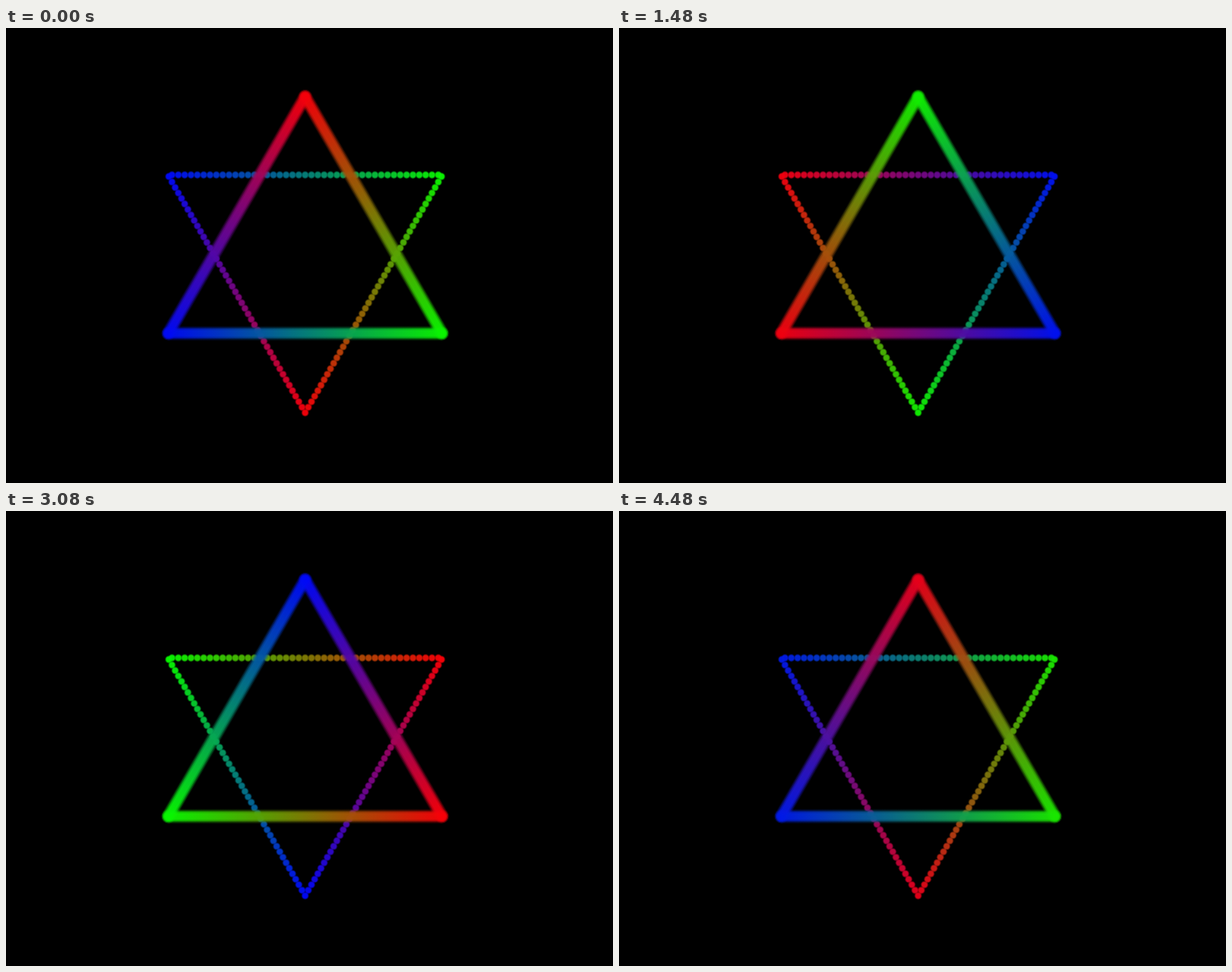
An HTML page with a canvas for the animation above (4520 ms loop, 768x576 px).

```html
<!DOCTYPE html>
<html lang="en">
<head>
<meta charset="utf-8">
<title>Colour-cycling star</title>
<style>
html, body { margin: 0; width: 100%; height: 100%; overflow: hidden; background: #000; }
canvas { display: block; }
</style>
</head>
<body>
<canvas id="stage" width="768" height="576"></canvas>
<script>
const ctx = document.getElementById('stage').getContext('2d');
const LOOP = 4520, STEP = 40, FADE = 1530, DELAY = 185, DOTS = 43;
const PRIMARIES = [[255, 0, 0], [0, 255, 0], [0, 0, 255]];

// Corners in the order top/bottom, right, left, so both triangles share colours.
const solid = [[378.5, 87], [551.5, 386.5], [205.5, 386.5]];
const dotted = [[378.5, 487], [551, 188], [206, 188]];

// Soft profiles, from the outer rim to the core: [size, opacity].
const lineLayers = [[18, .14], [15.5, .32], [13, .42], [11, .55], [8, .8]];
const dotLayers = [[4.9, .28], [4.2, .5], [3.4, .9]];

const mix = (a, b, k) => a.map((v, i) => v + (b[i] - v) * k);
const css = (c, alpha) => `rgba(${c.map(Math.round).join()},${alpha})`;
const smooth = u => u * u * (3 - 2 * u);

function cornerColours(time) {
  const phase = (time - DELAY) / FADE + 3;
  const n = Math.floor(phase);
  const eased = smooth(phase - n);
  return [0, 1, 2].map(i =>
    mix(PRIMARIES[(n + i) % 3], PRIMARIES[(n + i + 1) % 3], eased));
}

function dot([x, y], colour) {
  for (const [r, alpha] of dotLayers) {
    ctx.fillStyle = css(colour, alpha);
    ctx.beginPath();
    ctx.arc(x, y, r, 0, 7);
    ctx.fill();
  }
}

function drawDotted(colours) {
  for (let i = 0; i < 3; i++) {
    const j = (i + 1) % 3;
    const level = i === 1; // the level side sits half a step along
    for (let d = 0; d < DOTS; d++) {
      const k = (d + (level ? .5 : 0)) / DOTS;
      const [x, y] = mix(dotted[i], dotted[j], k);
      dot([x, level ? 186 : y], mix(colours[i], colours[j], k));
    }
  }
  dot(dotted[1], colours[1]);
}

function drawSolid(colours) {
  ctx.lineCap = 'round';
  for (const [width, alpha] of lineLayers) {
    ctx.lineWidth = width;
    for (let i = 0; i < 3; i++) {
      const j = (i + 1) % 3;
      const gradient = ctx.createLinearGradient(...solid[i], ...solid[j]);
      gradient.addColorStop(0, css(colours[i], alpha));
      gradient.addColorStop(1, css(colours[j], alpha));
      ctx.strokeStyle = gradient;
      ctx.beginPath();
      ctx.moveTo(...solid[i]);
      ctx.lineTo(...solid[j]);
      ctx.stroke();
    }
  }
}

function draw(time) {
  const colours = cornerColours(Math.floor(time % LOOP / STEP) * STEP);
  ctx.fillStyle = '#000';
  ctx.fillRect(0, 0, 768, 576);
  drawDotted(colours);
  drawSolid(colours);
}

const start = performance.now();
function tick() {
  draw(performance.now() - start);
  requestAnimationFrame(tick);
}
tick();
</script>
</body>
</html>
```
